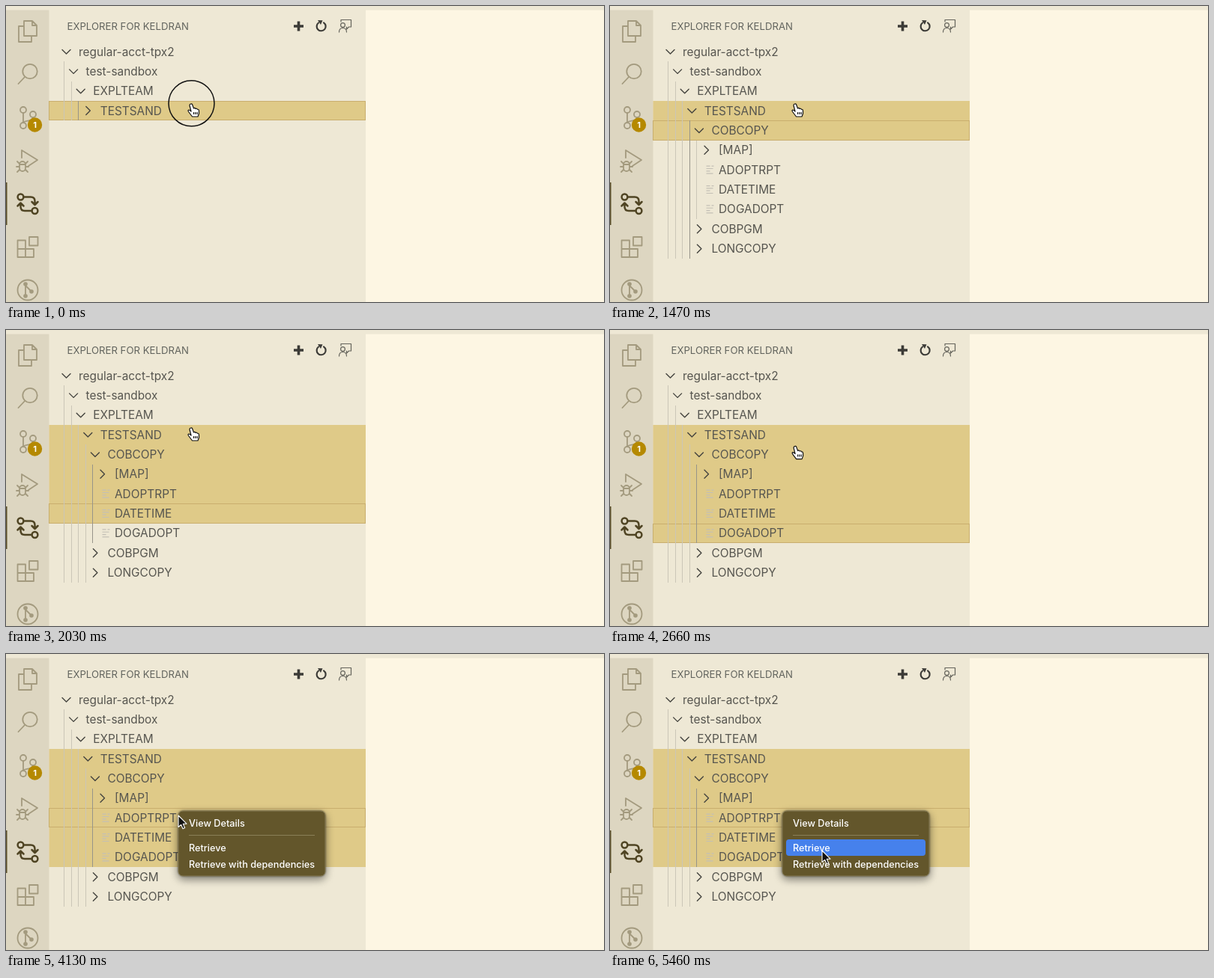
Write an HTML page that moves like this. It is 798x396 px and loops after 5530 ms.

```html
<!DOCTYPE html>
<html lang="en">
<head>
<meta charset="utf-8">
<style>
html, body { margin: 0; width: 100%; height: 100%; overflow: hidden; background: #fdf6e3; }
svg { display: block; }
text { font-family: Inter, Roboto, sans-serif; dominant-baseline: central; white-space: pre; }
.line { fill: none; stroke-linecap: round; stroke-linejoin: round; }
#rows text { font-size: 15.4px; fill: #56554f; }
#menu text { font-size: 12.7px; font-weight: 500; fill: #fff; }
</style>
</head>
<body>
<svg width="798" height="396" viewBox="0 0 798 396">
  <rect width="798" height="396" fill="#fdf6e3"/>
  <path d="M0 0H798V5.5H480V396H0z" fill="#eee8d5"/>
  <rect y="5.5" width="57.5" height="391" fill="#ddd6c1"/>

  <g class="line" stroke="#a39a7e" stroke-width="1.8">
    <path d="M24 20H35L41 26V40H24zM35 20V26H41M23 27H17V48H34V41"/>
    <circle cx="32" cy="87.500" r="9.700"/><path d="M25 95L16.500 104"/>
    <circle cx="23" cy="139" r="4"/><circle cx="23" cy="160" r="4"/><circle cx="36" cy="145" r="4"/>
    <path d="M23 143V156M36 149C36 154 29 153 24 155"/>
    <path d="M21 203V193L42 206L30 214"/>
    <path d="M18 212A4 4 0 0 1 26 212V217A4 4 0 0 1 18 217zM18 212H26M15 208L18 211M29 208L26 211M14 215H18M26 215H30M15 222L18 219M29 222L26 219"/>
    <path d="M15.500 313.500H26V336H15.500zM15.500 325H37V336H26M31 309H42.500V320.500H31z"/>
    <circle cx="29" cy="380" r="13.500"/><path d="M26 372V389M26 374L34 382"/>
    <g fill="#a39a7e" stroke="none"><circle cx="26" cy="372" r="2.800"/><circle cx="26" cy="388" r="2.800"/><circle cx="34" cy="382" r="2.800"/></g>
  </g>
  <circle cx="38.500" cy="159" r="9.700" fill="#b58900"/>
  <text x="38.500" y="159.300" font-size="11" font-weight="700" text-anchor="middle" fill="#fff">1</text>
  <rect y="236" width="1.500" height="57" fill="#584c27"/>
  <g class="line" stroke="#4f4423" stroke-width="2.500">
    <circle cx="19.500" cy="255.500" r="3.900"/><circle cx="38.500" cy="274" r="3.900"/>
    <path d="M23.500 255.500H33Q38.500 255.500 38.500 261V265M34.500 262L38.500 266L42.500 262M34.500 274H25Q19.500 274 19.500 268.500V264.500M15.500 267.500L19.500 263.500L23.500 267.500"/>
  </g>

  <text x="81.500" y="27.300" font-size="13.200" fill="#62645e">EXPLORER FOR KELDRAN</text>
  <path d="M384 27H397M390.500 20.500V33.500" stroke="#3c3b37" stroke-width="3.600"/>
  <path class="line" d="M417 22.500A6 6 0 1 0 424 22.300" stroke="#3c3b37" stroke-width="2.200"/>
  <path d="M416 19L422.500 19.300L420 25z" fill="#3c3b37"/>
  <g class="line" stroke="#65645c" stroke-width="1.200">
    <path d="M447 21V18.500H460.500V28H457.500L454.500 31V28"/>
    <circle cx="449.500" cy="25.500" r="2.900"/><path d="M444.500 35Q444.500 29.500 449.500 29.500T454.500 35"/>
  </g>

  <g id="rows"></g>
  <circle id="ring" cx="247.500" cy="130.300" r="30.500" fill="none" stroke="#111" stroke-width="1.500"/>

  <g id="menu">
    <rect x="230" y="210" width="196" height="87" rx="6" fill="#63562b" stroke="#857b55"
      style="filter:drop-shadow(0 4px 6px #0005) drop-shadow(0 0 1px #0008)"/>
    <path d="M244 242.500H412" stroke="#8a7f58"/>
    <rect id="hover" x="235" width="186" height="22" rx="4" fill="#4681ec"/>
    <text x="244" y="226.500">View Details</text>
    <text x="244" y="259.500">Retrieve</text>
    <text x="244" y="281.500">Retrieve with dependencies</text>
  </g>

  <path id="hand" fill="#fff" stroke="#111" stroke-width="1.200" stroke-linejoin="round"
    d="M-3 -8Q-1.500 -8.500 -.8 -7L1 -2Q2.500 -3.500 3.500 -1.500Q5 -2.500 6 -.7Q8 -1 8 1.500V5L6.500 9H-1L-5.500 3Q-7.500 .5 -5.500 0Q-4.500 0 -2.500 2L-4.500 -6Q-4.500 -7.700 -3 -8zM1 3V6M3.300 3V6M5.600 3V6"/>
  <path id="arrow" fill="#111" stroke="#fff" stroke-width="1.100" stroke-linejoin="round"
    d="M0 0V15.500L3.600 12.300L6 17.800L8.700 16.600L6.300 11.200H11z"/>
</svg>
<script>
const LOOP = 5530, STEP = 70, ROW = 26.37, INDENT = 9.6;
const el = id => document.getElementById(id);
const rowsBox = el("rows");

// label, depth, kind: open, closed or file
const tree = [
  ["regular-acct-tpx2", 0, "open"],
  ["test-sandbox", 1, "open"],
  ["EXPLTEAM", 2, "open"],
  ["TESTSAND", 3, "open"],
  ["COBCOPY", 4, "open"],
  ["[MAP]", 5, "closed"],
  ["ADOPTRPT", 5, "file"],
  ["DATETIME", 5, "file"],
  ["DOGADOPT", 5, "file"],
  ["COBPGM", 4, "closed"],
  ["LONGCOPY", 4, "closed"]
];

const rowY = i => 61 + i * ROW;
const rowTop = i => Math.round(rowY(i - .5));

function icon(kind, x, y) {
  if (kind === "file")
    return `<path d="M${x} ${y - 5}h5m2 0h3M${x} ${y - 1.7}h9M${x} ${y + 1.6}h5M${x} ${y + 4.9}h9" stroke="#c3bfb5" stroke-width="1.2"/>`;
  const d = kind === "open" ? `M${x - 5.5} ${y - 2.5}l5.5 5.5l5.5 -5.5` : `M${x - 2.5} ${y - 5.5}l5.5 5.5l-5.5 5.5`;
  return `<path class="line" d="${d}" stroke="#45443f" stroke-width="1.4"/>`;
}

function drawTree(expanded, last, focus) {
  const count = expanded ? tree.length : 4;
  const top = rowTop(3), focusTop = rowTop(focus);
  let out = `<rect x="57.500" y="${top}" width="422.500" height="${rowTop(last + 1) - top}" fill="#dfca88"/>` +
    `<rect x="57.500" y="${focusTop + .5}" width="422" height="${rowTop(focus + 1) - focusTop - 1}" fill="none" stroke="#c9ae6e"/>`;
  const active = !expanded ? 2 : last > 4 ? 4 : 3;
  for (let depth = 0; depth < (expanded ? 5 : 3); depth++) {
    const x = Math.floor(77.5 + depth * INDENT) + .5;
    const end = depth === 4 ? 9 : count;
    out += `<path d="M${x} ${rowTop(depth + 1)}V${rowTop(end)}" stroke="${depth === active ? "#97948a" : "#cbc6b7"}"/>`;
  }
  tree.slice(0, count).forEach(([label, depth, kind], i) => {
    const x = 80.5 + depth * INDENT, y = rowY(i);
    out += icon(i === 3 && !expanded ? "closed" : kind, x, y) +
      `<text x="${x + 16.5}" y="${y}">${label}</text>`;
  });
  return out;
}

// Linear path through [time, x, y] points
function along(points, t) {
  let a = points[0];
  for (const b of points) {
    if (t < b[0]) {
      const k = b[0] === a[0] || t < a[0] ? 0 : (t - a[0]) / (b[0] - a[0]);
      return [a[1] + (b[1] - a[1]) * k, a[2] + (b[2] - a[2]) * k];
    }
    a = b;
  }
  return [a[1], a[2]];
}

const handPath = [[2590, 249.5, 139], [2940, 250, 262], [3010, 250, 262], [3290, 230, 225]];
const smooth = k => k * k * (3 - 2 * k);
const place = (node, x, y) => node.setAttribute("transform", `translate(${x} ${y})`);
const show = (node, on) => node.style.display = on ? "" : "none";

let treeKey = "";

function draw(now) {
  const t = Math.floor(now % LOOP / STEP) * STEP;
  const last = 3 + [1470, 1680, 1820, 2030, 2170].filter(s => t >= s).length;
  const expanded = t >= 70, menuOpen = t >= 3570;
  const focus = menuOpen ? 6 : last;

  const key = [expanded, last, focus].join();
  if (key !== treeKey) {
    treeKey = key;
    rowsBox.innerHTML = drawTree(expanded, last, focus);
  }

  const k = smooth(Math.min(1, Math.max(0, (t - 4130) / 420)));
  const x = 230 + 53 * k, y = 216 + 47 * k;
  const onFirst = x > 235 && y < 237, onSecond = y >= 248;
  show(el("ring"), !expanded);
  show(el("menu"), menuOpen);
  show(el("hover"), onFirst || onSecond);
  el("hover").setAttribute("y", onSecond ? 248 : 215.5);
  show(el("hand"), !menuOpen);
  show(el("arrow"), menuOpen);
  place(el("hand"), ...along(handPath, t));
  place(el("arrow"), x, y);
}

let start;
function frame(now) {
  start ??= now;
  draw(Math.max(0, now - start));
  requestAnimationFrame(frame);
}
draw(0);
requestAnimationFrame(frame);
</script>
</body>
</html>
```
